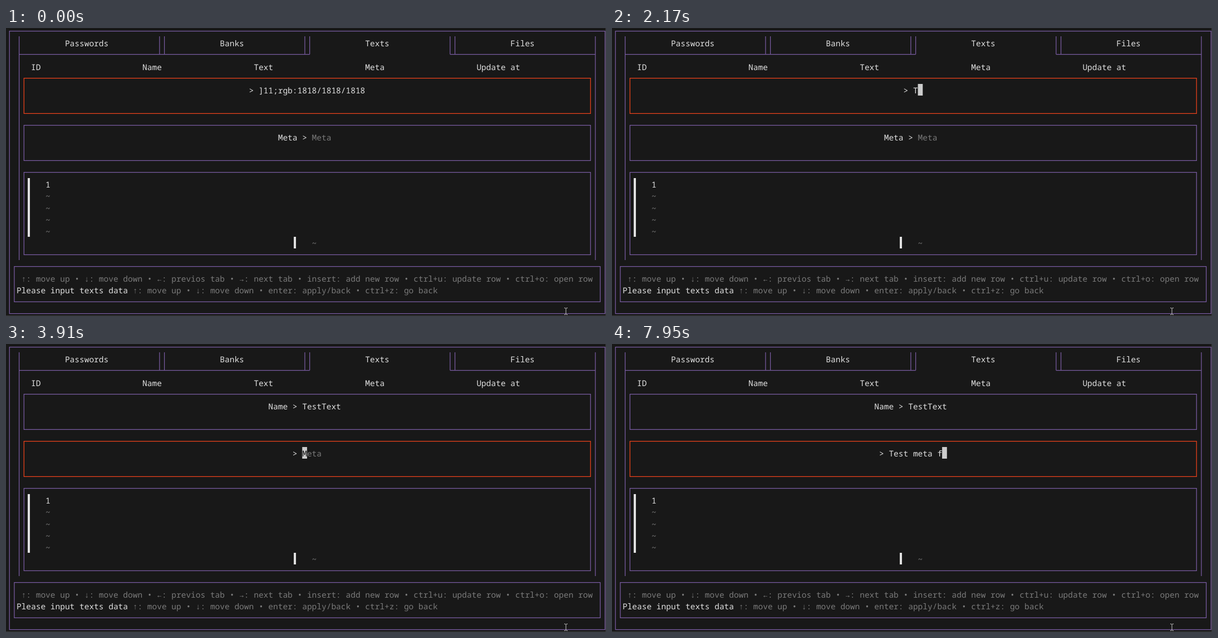
These frames come from a looping animation (1078x520 px, 8000 ms). An HTML page:

```html
<!DOCTYPE html>
<html lang="en">
<head>
<meta charset="utf-8">
<title>Terminal form</title>
<style>
  html, body { margin: 0; width: 100%; height: 100%; overflow: hidden; background: #181818; }
  svg { display: block; width: 1078px; height: 520px; }
  text {
    font: 14.5px "Noto Sans Mono", "DejaVu Sans Mono", monospace;
    text-rendering: geometricPrecision;
  }
</style>
</head>
<body>
<svg id="stage" viewBox="0 0 1078 520"><g id="fixed"></g><g id="form"></g></svg>
<script>
const LOOP = 8000;
const CELL_W = 8.7, CELL_H = 21.25;
const BG = '#181818', WHITE = '#e0e0e0', GRAY = '#7a7a7a', BLOCK = '#cccccc';
const PURPLE = '#7a5ca3', RED = '#ee421b', EDGE = '#3c3c3c';

const fixedLayer = document.getElementById('fixed');
const formLayer = document.getElementById('form');

// Cell edges, and the middle of a cell where box lines run.
const cellX = col => 1.5 + col * CELL_W;
const cellY = row => -5.25 + row * CELL_H;
const midX = col => 6.2 + col * CELL_W;
const midY = row => 5.5 + row * CELL_H;

function add(parent, tag, attrs) {
  const node = document.createElementNS('http://www.w3.org/2000/svg', tag);
  for (const key in attrs) node.setAttribute(key, attrs[key]);
  return parent.appendChild(node);
}

// Each word starts on the terminal grid.
function write(parent, col, row, string, fill = WHITE, weight = 400) {
  for (const word of string.matchAll(/\S+/g)) {
    add(parent, 'text', {
      x: cellX(col + word.index), y: Math.round(cellY(row) + 17), fill, 'font-weight': weight
    }).textContent = word[0];
  }
}

function stroke(parent, d, color = PURPLE) {
  add(parent, 'path', { d, fill: 'none', stroke: color, 'stroke-width': 1.25 });
}

function box(parent, col1, row1, col2, row2, color) {
  stroke(parent, `M${midX(col1)} ${midY(row1)}H${midX(col2)}V${midY(row2)}H${midX(col1)}Z`, color);
}

function block(parent, x, y, width, height, fill) {
  add(parent, 'rect', { x, y, width, height, fill });
}

function drawFixed() {
  block(fixedLayer, 0, 519, 1078, 1, EDGE);
  block(fixedLayer, 1077, 0, 1, 520, EDGE);
  box(fixedLayer, 0, 0, 123, 24);
  box(fixedLayer, 3, 12, 120, 19);
  box(fixedLayer, 1, 20, 122, 23);

  const tabLine = 47.5;
  for (const col of [2, 121]) stroke(fixedLayer, `M${midX(col)} 15V419`);
  for (const col of [31, 32, 61, 62, 91, 92]) stroke(fixedLayer, `M${midX(col)} 15V${tabLine}`);
  stroke(fixedLayer, `M${midX(2)} ${tabLine}H${midX(62)}M${midX(91)} ${tabLine}H${midX(121)}`);

  write(fixedLayer, 12, 1, 'Passwords');
  write(fixedLayer, 44, 1, 'Banks');
  write(fixedLayer, 74, 1, 'Texts');
  write(fixedLayer, 104, 1, 'Files');
  write(fixedLayer, 5, 3, 'ID');
  write(fixedLayer, 28, 3, 'Name');
  write(fixedLayer, 51, 3, 'Text');
  write(fixedLayer, 74, 3, 'Meta');
  write(fixedLayer, 97, 3, 'Update at');

  block(fixedLayer, 39, 271, 4, 106, WHITE);
  block(fixedLayer, 517, 377, 4, 21, WHITE);
  write(fixedLayer, 8, 13, '1', WHITE, 700);
  for (let row = 14; row < 18; row++) write(fixedLayer, 8, row, '~', GRAY);
  write(fixedLayer, 63, 18, '~', GRAY);

  write(fixedLayer, 3, 21, '↑: move up • ↓: move down • ←: previos tab • →: next tab • ' +
    'insert: add new row • ctrl+u: update row • ctrl+o: open row', GRAY);
  write(fixedLayer, 2, 22, 'Please input texts data');
  write(fixedLayer, 26, 22, '↑: move up • ↓: move down • enter: apply/back • ctrl+z: go back', GRAY);

  // Mouse pointer
  add(fixedLayer, 'path', {
    d: 'M1003 505.5h2l1 1l1 -1h2M1006 506V517M1003 517.5h2l1 -1l1 1h2',
    fill: 'none', stroke: '#c8c8c8', 'stroke-width': 1
  });
}

const REPLY = ']11;rgb:1818/1818/1818', NAME = 'TestText', META = 'Test meta f';

// [start ms, focused field, full text, typed length, cursor visible]
const steps = [
  [0, 0, REPLY, 22, false], [250, 0, REPLY, 22, true], [370, 0, REPLY, 21, true],
  [800, 0, REPLY, 20, true], [950, 0, REPLY, 15, true], [1100, 0, REPLY, 11, true],
  [1220, 0, REPLY, 7, true], [1340, 0, REPLY, 3, true], [1460, 0, REPLY, 0, true],
  [2170, 0, NAME, 1, true], [2320, 0, NAME, 2, true], [2440, 0, NAME, 3, true],
  [2560, 0, NAME, 4, true], [2810, 0, NAME, 5, true], [2960, 0, NAME, 6, true],
  [3080, 0, NAME, 7, true], [3200, 0, NAME, 8, true], [3760, 0, NAME, 8, false],
  [3910, 1, META, 0, true], [4880, 1, META, 1, true], [5000, 1, META, 2, true],
  [5150, 1, META, 3, true], [5680, 1, META, 3, false], [6230, 1, META, 3, true],
  [6760, 1, META, 4, true], [6910, 1, META, 5, true], [7030, 1, META, 6, true],
  [7180, 1, META, 7, true], [7300, 1, META, 8, true], [7550, 1, META, 10, true],
  [7950, 1, META, 11, true]
];

function drawField(row, label, value, focused, cursorOn) {
  box(formLayer, 3, row - 1, 120, row + 2, focused ? RED : PURPLE);
  const prompt = focused ? '> ' : label + ' > ';
  const shown = value || label;
  const hasCursor = focused && cursorOn;
  const width = prompt.length + shown.length + (hasCursor && value ? 1 : 0);
  const start = 4 + Math.floor((116 - width) / 2);
  const textCol = start + prompt.length;

  write(formLayer, start, row, prompt);
  write(formLayer, textCol, row, shown, value ? WHITE : GRAY);
  if (hasCursor) {
    const col = textCol + value.length;
    block(formLayer, cellX(col), Math.round(cellY(row)), CELL_W, 21, BLOCK);
    if (!value) write(formLayer, col, row, label[0], BG);
  }
}

let current = null;

function render(time) {
  const step = steps.findLast(([start]) => start <= time);
  if (step === current) return;
  current = step;
  const [, focus, text, length, cursorOn] = step;
  const typed = text.slice(0, length);
  formLayer.replaceChildren();
  drawField(5, 'Name', focus === 0 ? typed : NAME, focus === 0, cursorOn);
  drawField(9, 'Meta', focus === 1 ? typed : '', focus === 1, cursorOn);
}

drawFixed();
render(0);
const begin = performance.now();
(function tick() {
  render(Math.max(0, performance.now() - begin) % LOOP);
  requestAnimationFrame(tick);
})();
</script>
</body>
</html>
```
